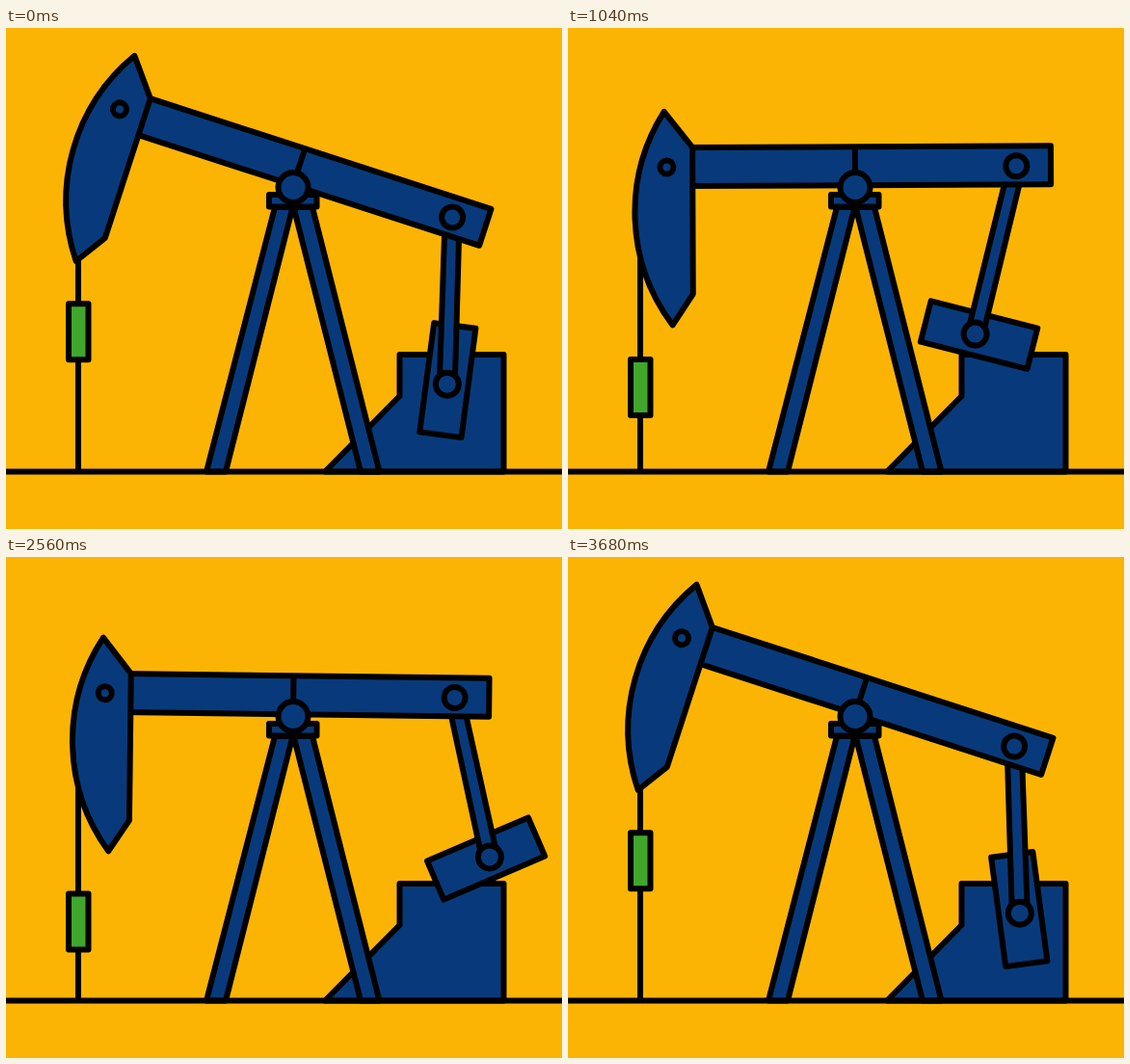
An HTML page for the animation above (3840 ms loop, 577 by 520 pixels).

```html
<!DOCTYPE html>
<html lang="en">
<head>
<meta charset="utf-8">
<title>Pumpjack</title>
<style>
  html, body { margin: 0; width: 100%; height: 100%; overflow: hidden; background: #fcb404; }
  svg { display: block; width: 577px; height: 520px; }
  .ink { fill: #083a7b; stroke: #000; stroke-width: 6; stroke-linejoin: round; }
  .line { fill: none; }
</style>
</head>
<body>
<svg viewBox="0 0 577 520">
  <rect width="577" height="520" fill="#fcb404"/>
  <g class="ink">
    <path d="M331 460.5L408.5 382V339H516.5V460.5Z"/>
    <rect id="crank" x="-21.8" y="-19.2" width="43.6" height="114.2"/>
    <path id="rod"/>
    <circle id="pin" r="12"/>

    <path d="M279 186L208 460.5H228L297.5 186Z"/>
    <path d="M298.5 186L368 460.5H387.500L318 186Z"/>
    <rect x="273" y="173" width="49.500" height="12.500"/>
    <path class="line" d="M75 200V460.5"/>

    <g id="beam">
      <rect x="-180" y="-39.8" width="383.1" height="40"/>
      <path class="line" d="M0 -39.8V0"/>
      <circle cx="167.4" cy="-19.1" r="11"/>
      <path d="M-198 -77A195 195 0 0 0 -190 144.6L-168.7 112.4V-39.8Z"/>
      <circle cx="-195.5" cy="-19.4" r="7"/>
    </g>

    <circle cx="298" cy="165.5" r="15.5"/>
    <rect id="weight" x="65" width="20.5" height="58" style="fill:#40a62c"/>
    <path class="line" d="M0 460.5H577"/>
  </g>
</svg>
<script>
  const LOOP = 3840, STEP = 80, LAST = 46;
  const PIVOT = { x: 298, y: 163 }, AXLE = { x: 463.3, y: 328 };
  const $ = id => document.getElementById(id);
  const crank = $('crank'), rod = $('rod'), pin = $('pin'), beam = $('beam'), weight = $('weight');

  const ease = p => p * p * (3 - 2 * p);
  const place = (o, deg, x, y) => {
    const a = deg * Math.PI / 180, c = Math.cos(a), s = Math.sin(a);
    return { x: o.x + x * c - y * s, y: o.y + x * s + y * c };
  };
  const turn = (el, o, deg) =>
    el.setAttribute('transform', `translate(${o.x} ${o.y}) rotate(${deg})`);

  // 0 = horsehead up, 1 = down
  const drop = n => n < 23 ? ease((n + 1) / 24) : 1 - ease((n - 23) / 24);
  // the beam starts back up slightly before the weight does
  const tilt = n => n <= 22 ? ease((n + 1) / 24) : 1 - ease(((n - 22) / 25) ** 0.9);

  function draw(n) {
    const spin = 7.5 * (n + 1) - 0.9 * Math.sin(Math.PI * n / 47);
    const angle = 18.1 - 29.4 * tilt(n);
    const top = place(PIVOT, angle, 167.4, -19.1);
    const low = place(AXLE, spin, 0, 42);
    const lean = Math.atan2(low.y - top.y, low.x - top.x) * 180 / Math.PI;
    const corners = [
      place(top, lean, 0, -7.5), place(low, lean, 0, -8),
      place(low, lean, 0, 8), place(top, lean, 0, 7.5)
    ];

    turn(crank, AXLE, spin);
    turn(beam, PIVOT, angle);
    rod.setAttribute('d', 'M' + corners.map(p => `${p.x} ${p.y}`).join('L') + 'Z');
    pin.setAttribute('cx', low.x);
    pin.setAttribute('cy', low.y);
    weight.setAttribute('y', 285.7 + 93.3 * drop(n));
  }

  const start = performance.now();
  function tick() {
    const t = (performance.now() - start) % LOOP;
    draw(Math.min(Math.floor(t / STEP), LAST));
    requestAnimationFrame(tick);
  }
  tick();
</script>
</body>
</html>
```
